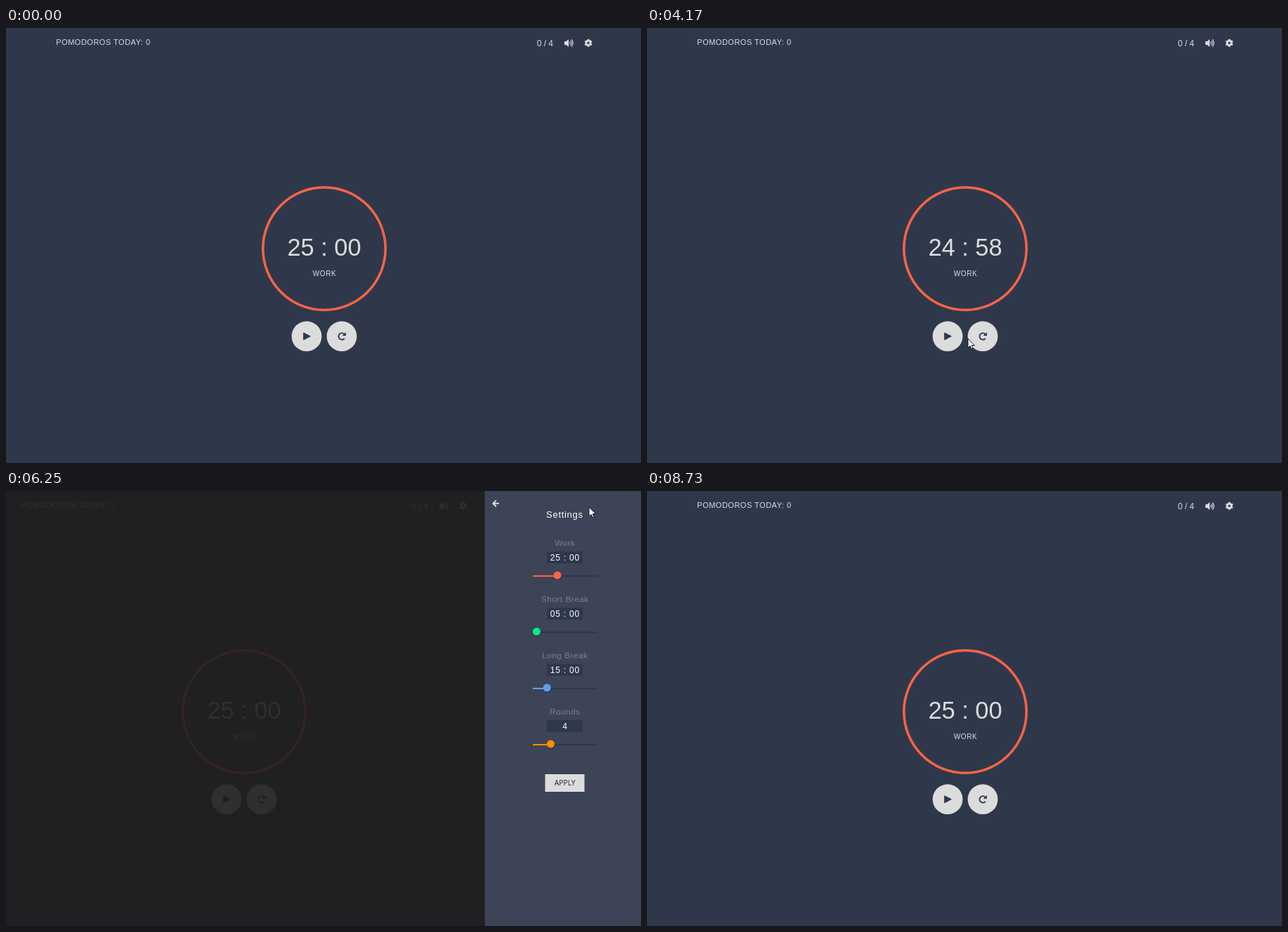
An HTML page for the animation above (9200 ms loop, 904x619 px).

```html
<!DOCTYPE html>
<html lang="en">
<head>
<meta charset="utf-8">
<title>Pomodoro timer</title>
<style>
  html, body { margin: 0; width: 100%; height: 100%; overflow: hidden; background: #2f384b; }
  svg { display: block; font-family: "Liberation Sans", Arial, sans-serif; }
  .mid { text-anchor: middle; }
  .light { fill: #dcdcdc; }
  .ink { fill: #2f384b; }
  .line { fill: none; stroke: #dcdcdc; }
  .label { font-size: 11.6px; letter-spacing: .6px; fill: #7b8190; }
  .value { font-size: 12px; letter-spacing: .8px; fill: #fff; }
</style>
</head>
<body>
<svg width="904" height="619" viewBox="0 0 904 619">
  <rect class="ink" width="904" height="619"/>
  <text id="title" class="light" x="71.3" y="23.5" font-size="11" letter-spacing=".5">POMODOROS TODAY: 0</text>

  <g id="tools">
    <text class="light" x="755.7" y="25.5" font-size="12">0 / 4</text>
    <path class="light" d="M795 19h2.5l3.5-3v11l-3.5-3H795z"/>
    <path class="line" stroke-width="1.1" stroke-linecap="round"
      d="M802.5 20q1.2 1.5 0 3M803.9 18.3q2.5 3.2 0 6.4M805.3 16.7q3.8 4.8 0 9.6"/>
    <circle class="line" cx="829" cy="21.3" r="3.1" stroke-width="2.8"/>
    <circle class="line" cx="829" cy="21.3" r="4.7" stroke-width="1.8" pathLength="12"
      stroke-dasharray="1" transform="rotate(15 829 21.3)"/>
  </g>

  <g id="timer">
    <circle cx="453" cy="314" r="87.2" fill="none" stroke="#ff6347" stroke-width="3.5"/>
    <text id="clock" class="light mid" x="453" y="324" font-size="34.4"></text>
    <text class="light mid" x="453.6" y="352.5" font-size="10" letter-spacing=".6">WORK</text>
    <circle class="light" cx="428" cy="438.7" r="21.4"/>
    <circle class="light" cx="478" cy="438.7" r="21.4"/>
    <path id="play" class="ink" stroke="#2f384b" stroke-linejoin="round" stroke-width="1.4"
      d="M423.8 434v9.4l9-4.7z"/>
    <path id="pause" class="ink" d="M423 433.5h4.2v10.2H423zM429 433.5h4.2v10.2H429z"/>
    <path fill="none" stroke="#2f384b" stroke-width="1.9" d="M481.6 435.6a4.7 4.7 0 1 0 .2 6.2"/>
    <path class="ink" d="M483.8 432.8v5.1h-5.1z"/>
  </g>

  <g id="panel">
    <rect width="682" height="619" fill="#1e1d1d" opacity=".9"/>
    <rect x="681.5" width="222.5" height="619" fill="#3d4457"/>
    <path class="line" stroke-width="2" d="M702 17.8h-8.4M697.8 13.4l-4.4 4.4 4.4 4.4"/>
    <text class="mid" x="795.4" y="38" font-size="13" letter-spacing=".7" fill="#fff">Settings</text>
    <g id="rows"></g>
    <rect class="light" x="767.5" y="403" width="56" height="25"/>
    <text class="mid" x="795.7" y="419" font-size="10.3" fill="#222"
      style="font-family:'Open Sans',sans-serif">APPLY</text>
  </g>

  <circle id="flash" r="9" fill="#ff0" opacity=".5"/>
  <g id="cursor" fill="#fff" stroke="#111" stroke-width=".9" stroke-linejoin="round">
    <path id="arrow" d="M0 0V13L3 10.3L5 14.6L7 13.7L5.1 9.5H9.3Z"/>
    <path id="hand" d="M-1.3 1.3a1.3 1.3 0 0 1 2.6 0V6l5 1q2 .5 2 2.5v2q0 2-1.5 4V17H-.5v-1.5L-4 10.5q-.8-1.5.5-2t2.2 1.5Z"/>
  </g>
</svg>

<script>
const LOOP = 9200;
const el = id => document.getElementById(id);
const show = (id, on) => el(id).setAttribute("display", on ? "inline" : "none");
const shift = (id, x, y = 0) => el(id).setAttribute("transform", `translate(${x} ${y})`);

const minutesX = m => 748.1 + 1.475 * m;
const row = (name, value, x, color, i) => `<g transform="translate(0 ${i * 80})">
  <text class="label mid" x="795.8" y="78">${name}</text>
  <rect class="ink" x="770" y="86" width="51" height="17"/>
  <text class="value mid" x="795.9" y="98.5">${value}</text>
  <path stroke="#2f384b" stroke-width="2" d="M750 121H842"/>
  <path stroke="${color}" stroke-width="2" d="M750 121H${x}"/>
  <circle cx="${x + .6}" cy="120.8" r="5.8" fill="#222a3a"/>
  <circle cx="${x}" cy="120" r="5.6" fill="${color}"/></g>`;
el("rows").innerHTML =
  row("Work", "25 : 00", minutesX(25), "#ff6347", 0) +
  row("Short Break", "05 : 00", minutesX(5), "#05ec8c", 1) +
  row("Long Break", "15 : 00", minutesX(15), "#629df0", 2) +
  row("Rounds", "4", 775.5, "#ff8c00", 3);

// Pointer legs: each glides on from the last stop, bowed sideways by a share of its length
const origin = { x: 514, y: 528 };
const legs = [
  { from: 70, to: 590, x: 441, y: 437, bow: -.9 },
  { from: 1070, to: 1071, x: 490, y: 449 },
  { from: 1330, to: 1530, x: 431, y: 438 },
  { from: 1990, to: 1991, x: 481, y: 452 },
  { from: 2100, to: 2310, x: 429, y: 477 },
  { from: 3200, to: 3620, x: 430, y: 442, bow: 1.4 },
  { from: 4000, to: 4170, x: 457, y: 442, bow: .6 },
  { from: 4260, to: 4320, x: 482, y: 439 },
  { from: 5000, to: 6030, x: 830, y: 23, bow: .42 },
  { from: 6700, to: 7410, x: 697, y: 18 },
  { from: 8000, to: 8700, x: 845, y: 603 },
];
const clicks = [840, 3690, 4480, 6180, 7880];

function pointer(t) {
  let { x, y } = origin;
  for (const leg of legs) {
    const u = Math.min(1, Math.max(0, (t - leg.from) / (leg.to - leg.from)));
    const ease = u * u * (3 - 2 * u);
    const side = (leg.bow || 0) * 4 * ease * (1 - ease);
    const dx = leg.x - x, dy = leg.y - y;
    x += dx * ease - dy * side;
    y += dy * ease + dx * side;
    if (u < 1) break;
  }
  return [x, y];
}

function draw(t) {
  const within = (from, to) => t >= from && t < to;
  const open = within(6250, 7960);
  const running = within(910, 3770);
  const [x, y] = pointer(t);
  const near = (cx, cy, r) => Math.hypot(x - cx, y - cy) < r;
  const hover = open ? near(697, 18, 9)
    : near(428, 438.7, 20.5) || near(478, 438.7, 20.5) || near(829, 22, 8);

  el("clock").textContent = within(1910, 2860) ? "24 : 59"
    : within(2860, 4560) ? "24 : 58" : "25 : 00";
  show("play", !running);
  show("pause", running);
  show("panel", open);
  shift("title", open ? -50 : 0);
  shift("tools", open ? -178 : 0);
  shift("timer", open ? -114 : 0);
  show("cursor", within(70, 8730));
  shift("cursor", x, y);
  show("hand", hover);
  show("arrow", !hover);
  show("flash", clicks.some(c => within(c, c + 70)) || within(7880, 7960));
  shift("flash", x, y - .5);
}

const start = performance.now();
function tick() {
  draw((performance.now() - start) % LOOP);
  requestAnimationFrame(tick);
}
tick();
</script>
</body>
</html>
```
